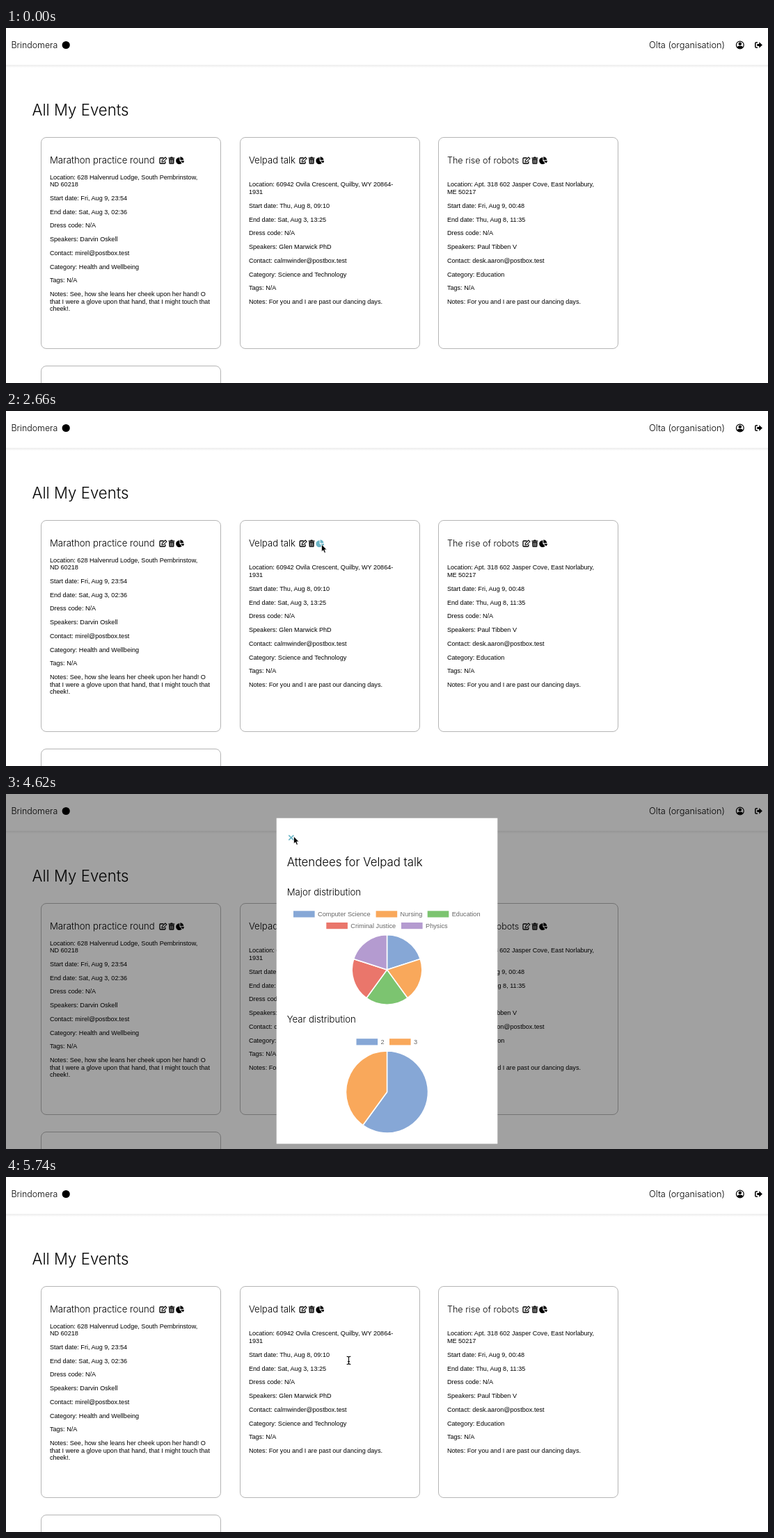
An HTML page that plays this animation: 1095x511 px, repeating every 5810 ms.

```html
<!DOCTYPE html>
<html lang="en">
<head>
<meta charset="utf-8">
<title>All My Events</title>
<style>
  html, body { margin: 0; width: 100%; height: 100%; overflow: hidden; background: #fff; }
  svg { display: block; width: 1095px; height: 511px; }
  .head { font-family: Montserrat, Inter, sans-serif; font-weight: 350; }
  .body { font: 9.1px "Liberation Sans", Arial, sans-serif; }
  .legend { font: 9.2px "Liberation Sans", Arial, sans-serif; fill: #666; }
  .line { fill: none; stroke: #000; }
</style>
</head>
<body>
<svg id="stage" viewBox="0 0 1095 511" xmlns="http://www.w3.org/2000/svg">
  <defs>
    <linearGradient id="shade" x2="0" y2="1">
      <stop offset="0" stop-color="#ededed"/>
      <stop offset="1" stop-color="#fafafa"/>
    </linearGradient>
    <g id="edit">
      <path class="line" stroke-width="1.3" d="M6.2 1.7H1.6q-.9 0-.9.9V8.8q0 .9.9.9H7.7q.9 0 .9-.9V6.7"/>
      <path class="line" stroke-width="1.1" d="M4 5.3 8.6.8 10.6 2.8 6 7.3 3.8 7.6Z"/>
    </g>
    <g id="trash">
      <path d="M0 .9H2.6L3.2 0H5.6L6.2.9H8.8V2.1H0ZM.6 2.7H8.2L7.9 9.2q0 1-1 1H1.9q-1 0-1-1Z"/>
      <path stroke="#fff" stroke-width=".7" d="M2.7 4V9M4.4 4V9M6.1 4V9"/>
    </g>
    <path id="pie" d="M4.7 1V5.9L8 9.2A4.9 4.9 0 1 1 4.7 1ZM5.7 0V4.9H10.5A4.9 4.9 0 0 0 5.7 0ZM6 5.9H11.2A5 5 0 0 1 9.6 9.4Z"/>
  </defs>
  <g id="page"></g>
  <g id="modal"></g>
  <path id="arrow" d="M0 0V10.6L2.4 8.4 4.1 12.3 5.9 11.5 4.3 7.7H7.5Z" stroke="#fff" stroke-width=".7"/>
  <g id="beam" fill="none">
    <path stroke="#fff" stroke-width="2.2" opacity=".8" d="M0-4.8V4.8"/>
    <path stroke="#000" stroke-width="1.1" d="M-2.9-5.7Q0-5.7 0-4Q0-5.7 2.9-5.7M-2.9 5.7Q0 5.7 0 4Q0 5.7 2.9 5.7M0-4.5V4.5M-1.5 1.6H1.5"/>
  </g>
</svg>
<script>
const LOOP = 5810, STEP = 70, OPEN = 2730, CLOSE = 5250;
const BLUE = '#86a7d6', ORANGE = '#f9a85b', GREEN = '#7cc470', RED = '#ea766b', PURPLE = '#b49bd0';
const HOVER = '#6bb5c6';

const $ = id => document.getElementById(id);
const text = (x, y, str, cls, size) =>
  `<text x="${x}" y="${y}" class="${cls}"${size ? ` font-size="${size}"` : ''}>${str}</text>`;
const head = (x, y, str, size) => text(x, y, str, 'head', size);
const frame = (x, y) =>
  `<rect x="${x}" y="${y}" width="258" height="304" rx="7.5" fill="#fff" stroke="#b5b5b5"/>`;

// Each card: left edge, title, title size, icon x, first text line, paragraphs ("|" breaks a line).
const cards = [
  [50.5, 'Marathon practice round', 13.2, 220.3, 217.5, [
    'Location: 628 Halvenrud Lodge, South Pembrinstow,|ND 60218',
    'Start date: Fri, Aug 9, 23:54', 'End date: Sat, Aug 3, 02:36', 'Dress code: N/A',
    'Speakers: Darvin Oskell', 'Contact: mirel@postbox.test',
    'Category: Health and Wellbeing', 'Tags: N/A',
    'Notes: See, how she leans her cheek upon her hand! O|that I were a glove upon that hand, that I might touch that|cheek!.']],
  [336.5, 'Velpad talk', 13.2, 421.5, 228.3, [
    'Location: 60942 Ovila Crescent, Quilby, WY 20864-|1931',
    'Start date: Thu, Aug 8, 09:10', 'End date: Sat, Aug 3, 13:25', 'Dress code: N/A',
    'Speakers: Glen Marwick PhD', 'Contact: calmwinder@postbox.test',
    'Category: Science and Technology', 'Tags: N/A',
    'Notes: For you and I are past our dancing days.']],
  [621.5, 'The rise of robots', 12.6, 742.3, 228.3, [
    'Location: Apt. 318 602 Jasper Cove, East Norlabury,|ME 50217',
    'Start date: Fri, Aug 9, 00:48', 'End date: Thu, Aug 8, 11:35', 'Dress code: N/A',
    'Speakers: Paul Tibben V', 'Contact: desk.aaron@postbox.test',
    'Category: Education', 'Tags: N/A',
    'Notes: For you and I are past our dancing days.']]
];

function card([x, title, size, iconX, y, paragraphs], i) {
  let out = frame(x, 157.5) + head(x + 12.4, 195, title, size)
    + `<use href="#edit" x="${iconX}" y="185.3"/>`
    + `<use href="#trash" x="${iconX + 13.2}" y="185.6"/>`
    + `<use href="#pie" id="pie${i}" x="${iconX + 24.4}" y="185.2"/>`;
  for (const p of paragraphs) {
    for (const row of p.split('|')) {
      out += text(x + 12.4, y.toFixed(1), row, 'body');
      y += 10.65;
    }
    y += 9.1;
  }
  return out;
}

function pie(cx, cy, r, slices) {
  const at = a => `${cx + r * Math.sin(a)} ${cy - r * Math.cos(a)}`;
  let angle = 0;
  return slices.map(([part, color]) => {
    const end = angle + part * 2 * Math.PI;
    const d = `M${cx} ${cy}L${at(angle)}A${r} ${r} 0 ${part > .5 ? 1 : 0} 1 ${at(end)}Z`;
    angle = end;
    return `<path d="${d}" fill="${color}" stroke="#fff" stroke-width="1.55" stroke-linejoin="bevel"/>`;
  }).join('');
}

const legend = (x, y, label, color) =>
  `<rect x="${x}" y="${y}" width="30.6" height="9.2" fill="${color}"/>` + text(x + 35, y + 8, label, 'legend');

$('page').innerHTML =
  `<rect y="53" width="1095" height="3.5" fill="url(#shade)"/>`
  + head(7.5, 29.2, 'Brindomera', 12.4) + '<circle cx="86.2" cy="24.5" r="5.6"/>'
  + '<g text-anchor="end">' + head(1033, 29.2, 'Olta (organisation)', 12.8) + '</g>'
  + '<circle class="line" cx="1054.8" cy="24.5" r="5.4" stroke-width="1.2"/>'
  + '<circle cx="1054.8" cy="22.7" r="2.3"/><path d="M1050.7 27.8Q1051.4 25.7 1053.2 25.7H1056.4Q1058.2 25.7 1058.9 27.8Q1057.2 29.6 1054.8 29.6T1050.7 27.8Z"/>'
  + '<path class="line" stroke-width="1.5" d="M1080 20.7H1078.2Q1076.8 20.7 1076.8 22.1V26.9Q1076.8 28.3 1078.2 28.3H1080"/>'
  + '<path d="M1079.3 22.9H1082.3V20.2L1086.9 24.5 1082.3 28.8V26.1H1079.3Z"/>'
  + head(37.5, 126, 'All My Events', 22.2)
  + cards.map(card).join('') + frame(50.5, 486.5);

$('modal').innerHTML =
  '<rect width="1095" height="511" opacity=".37"/>'
  + '<rect x="388.7" y="34.7" width="317.6" height="468.8" fill="#fff"/>'
  + '<path id="cross" fill="none" stroke-width="1.5" d="M406.3 59.4 413.3 66.4M413.3 59.4 406.3 66.4"/>'
  + head(403.7, 104, 'Attendees for Velpad talk', 16.8)
  + head(403.7, 146, 'Major distribution', 13.2)
  + head(403.7, 329, 'Year distribution', 13.2)
  + legend(413, 168.3, 'Computer Science', BLUE) + legend(531.6, 168.3, 'Nursing', ORANGE)
  + legend(605.7, 168.3, 'Education', GREEN) + legend(460.3, 185, 'Criminal Justice', RED)
  + legend(568, 185, 'Physics', PURPLE)
  + pie(547.5, 253, 50.3, [BLUE, ORANGE, GREEN, RED, PURPLE].map(c => [.2, c]))
  + legend(503.5, 352.2, '2', BLUE) + legend(551, 352.2, '3', ORANGE)
  + pie(547.5, 429, 59, [[.6, BLUE], [.4, ORANGE]]);

// Pointer stops: time, x, y.
const stops = [
  [350, 534, 466], [840, 447.5, 169], [910, 446.5, 169], [1400, 448, 172], [1470, 448, 172],
  [1540, 460, 191], [1610, 453.5, 193], [1820, 453.5, 193], [1890, 453.5, 192], [2870, 453.5, 192],
  [3220, 448, 179], [3990, 448, 179], [4130, 446.5, 170], [4550, 413.5, 61], [5530, 413.5, 61], [5740, 492.5, 264]
];

function pointer(t) {
  const i = stops.findIndex(s => s[0] > t);
  if (i < 0) return stops[stops.length - 1].slice(1);
  const [t0, x0, y0] = stops[i - 1], [t1, x1, y1] = stops[i];
  const k = (t - t0) / (t1 - t0), e = k * k * (3 - 2 * k);
  return [x0 + (x1 - x0) * e, y0 + (y1 - y0) * e];
}

const show = (id, on) => $(id).setAttribute('visibility', on ? 'visible' : 'hidden');

function draw(now) {
  const t = Math.floor((now % LOOP) / STEP) * STEP;
  const open = t >= OPEN && t < CLOSE, present = t >= stops[0][0];
  const [x, y] = present ? pointer(t) : [0, 0];
  const overText = present && !open && y > 208 && y < 402;
  show('modal', open);
  show('arrow', present && !overText);
  show('beam', overText);
  for (const id of ['arrow', 'beam']) $(id).setAttribute('transform', `translate(${x} ${y})`);
  $('pie1').setAttribute('fill', t >= 1610 && t < OPEN ? HOVER : '#000');
  $('cross').setAttribute('stroke', open && x < 415 && y < 68 ? HOVER : '#8a8a8a');
  requestAnimationFrame(() => draw(performance.now()));
}
draw(performance.now());
</script>
</body>
</html>
```
